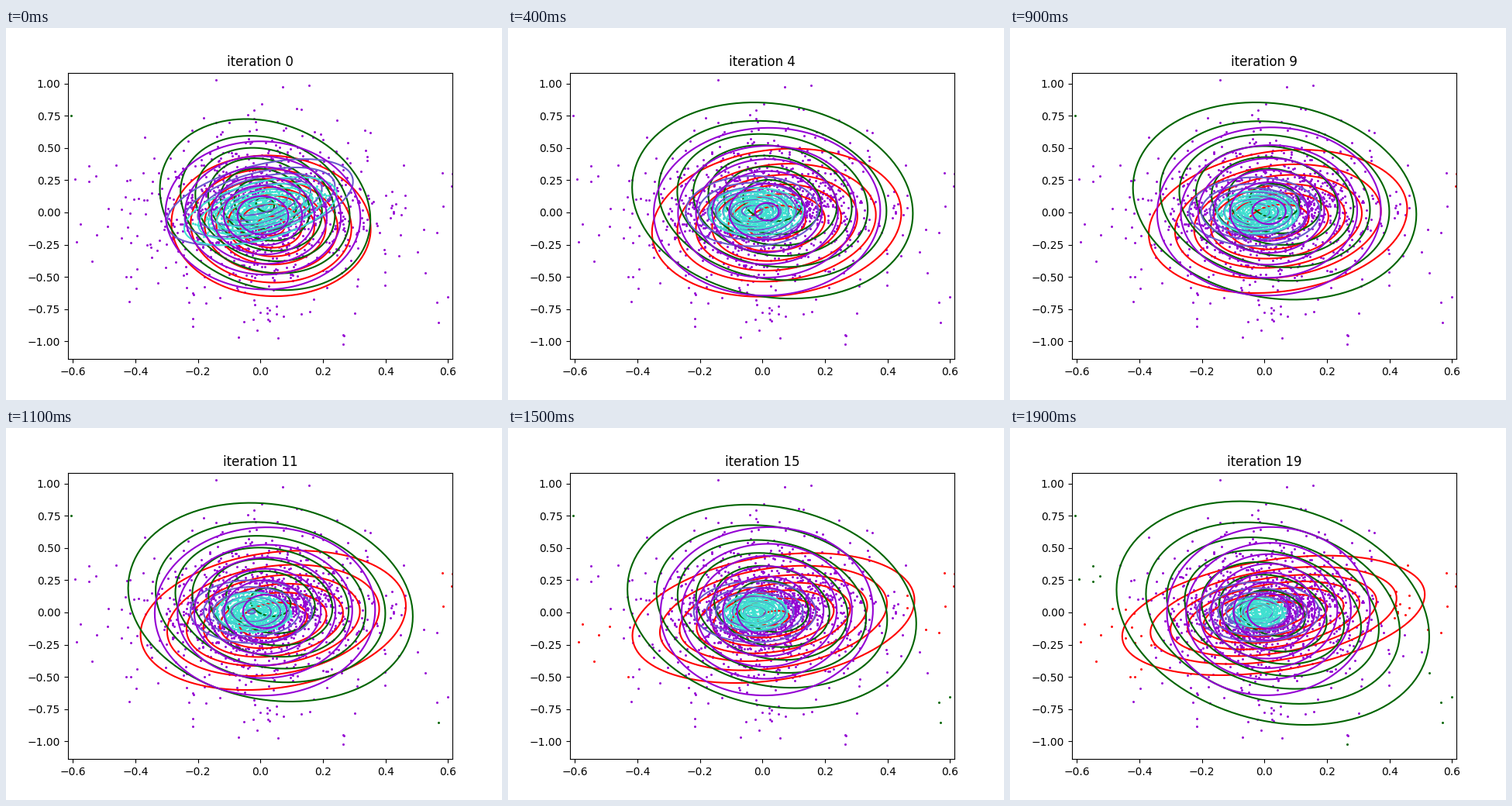
Animation of 640x480 px, one loop 2 s. Source, as a matplotlib script:

```python
import numpy as np
import matplotlib.pyplot as plt
from matplotlib.animation import FuncAnimation
from matplotlib.collections import LineCollection

FRAMES, INTERVAL = 20, 100
PX, PY, X0, Y0 = 403.5, 166.4, 328.3, 237.98   # pixels per unit, pixel origin
SETTLED = 6                                    # iteration where the drift begins

# Color, log weight, drift power, then the start, settled and end poses,
# each as mean x, mean y, sigma x, sigma y, correlation; in drawing order
CLUSTERS = [
    ("red", -1.5, 1.25, (.034, -.104, .160, .274, -.04),
     (.046, -.078, .207, .296, .14), (.029, -.023, .239, .229, .35)),
    ("darkgreen", -2.6, 2, (.015, .061, .170, .335, -.18),
     (.033, .094, .225, .379, -.13), (.027, -.005, .248, .430, -.21)),
    ("slateblue", -1.1, 1, (-.002, .080, .150, .168, .48),
     (-.035, .007, .104, .135, 0), (-.020, .005, .100, .118, 0)),
    ("turquoise", -.6, 1, (0, .010, .120, .130, .50),
     (-.022, .003, .072, .090, 0), (-.022, 0, .040, .058, 0)),
    ("darkviolet", 0, 1.25, (.008, -.023, .159, .293, -.03),
     (.015, .007, .1918, .344, .02), (.013, .010, .161, .3235, .02)),
]

rng = np.random.default_rng(11)


def blob(n, sx, sy, rho):
    u, v = rng.standard_normal((2, n))
    return np.column_stack([sx * u - .01,
                            sy * (rho * u + np.sqrt(1 - rho ** 2) * v)])


def make_points():
    """A heavy-tailed cloud around a tilted and a round core."""
    cloud = rng.standard_t(4, (1050, 2)) * (.14, .255)
    return np.vstack([cloud, blob(400, .12, .14, .35), blob(430, .065, .085, .2),
                      [(-.605, .75), (.565, -.70), (.265, -1.02)]])


def pose(i, power, start, settled, end):
    """Fast approach to the settled pose, then a slow drift to the end."""
    start, settled, end = map(np.array, (start, settled, end))
    drift = max(0, (i - SETTLED) / (FRAMES - 1 - SETTLED)) ** power
    return (settled + (start - settled) * np.exp(-i / 1.3)
            + (end - settled) * drift)


def log_density(pts, mx, my, sx, sy, rho):
    zx, zy = (pts[:, 0] - mx) / sx, (pts[:, 1] - my) / sy
    q = 1 - rho ** 2
    dist = (zx ** 2 - 2 * rho * zx * zy + zy ** 2) / q
    return -np.log(sx * sy * np.sqrt(q)) - dist / 2


def level_step(peak):
    """Smallest round step that splits the peak into at most eight levels."""
    raw = peak / 8
    base = 10 ** np.floor(np.log10(raw))
    return next(s * base for s in (1, 1.5, 2, 2.5, 3, 4, 5, 6, 8, 10)
                if s * base >= raw)


def contours(mx, my, sx, sy, rho):
    q = np.sqrt(1 - rho ** 2)
    peak = 1 / (2 * np.pi * sx * sy * q)
    n = peak / level_step(peak)
    a = np.linspace(0, 2 * np.pi, 121)
    ring = np.column_stack([sx * np.cos(a),
                            sy * (rho * np.cos(a) + q * np.sin(a))])
    return [ring * np.sqrt(2 * np.log(n / k)) + (mx, my)
            for k in range(1, int(np.ceil(n)))]


points = make_points()
fig, ax = plt.subplots(figsize=(6.4, 4.8), dpi=100)
ax.set_xlim((80 - X0) / PX, (576 - X0) / PX)
ax.set_ylim((Y0 - 427.2) / PY, (Y0 - 57.6) / PY)
title = ax.set_title("iteration 0")

dots, rings = [], []
for color, *_ in CLUSTERS:
    dots.append(ax.scatter([], [], s=4.6, color=color, linewidths=0, zorder=1))
    rings.append(ax.add_collection(
        LineCollection([], colors=color, linewidths=1.5, zorder=2),
        autolim=False))


def draw(i):
    title.set_text(f"iteration {i}")
    fits = [pose(i, *motion) for _, _, *motion in CLUSTERS]
    scores = np.array([log_density(points, *fit) + cluster[1]
                       for fit, cluster in zip(fits, CLUSTERS)])
    owner = scores.argmax(axis=0)
    for k, fit in enumerate(fits):
        dots[k].set_offsets(points[owner == k])
        rings[k].set_segments(contours(*fit))
    return [title, *dots, *rings]


anim = FuncAnimation(fig, draw, frames=FRAMES, interval=INTERVAL,
                     init_func=lambda: draw(0), repeat=True, repeat_delay=0)
plt.show()
```
